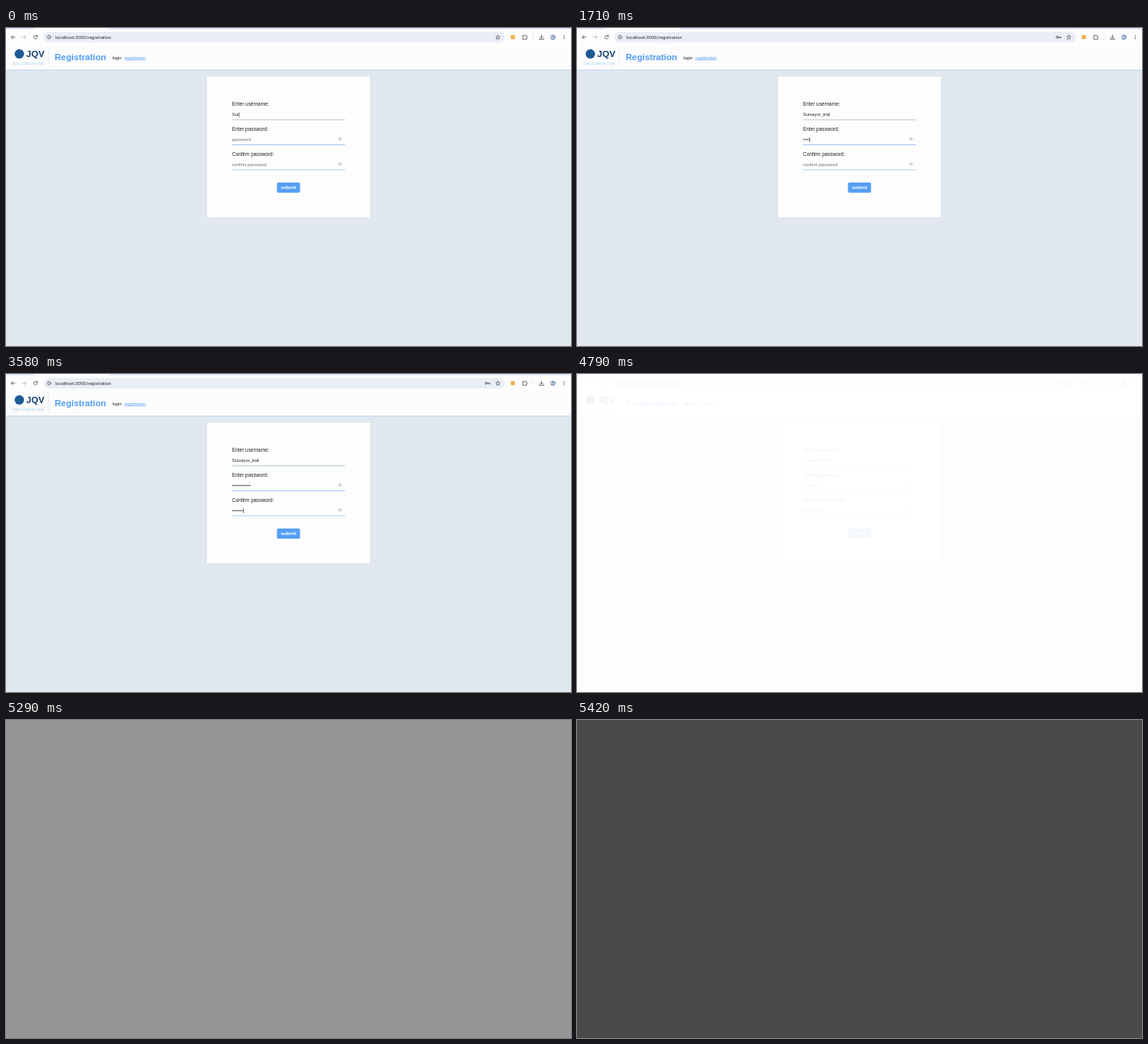
These frames come from a looping animation (720 px wide and 405 px high, 5.46 s). An HTML page:

```html
<!DOCTYPE html>
<html lang="en">
<head>
<meta charset="utf-8">
<title>Registration</title>
<style>
  html, body { margin: 0; width: 100%; height: 100%; overflow: hidden; background: #e1e8f0; }
  svg { display: block; width: 100vw; height: 100vh; }
  text { font-family: "Liberation Sans", Arial, sans-serif; fill: #222; white-space: pre; }
  .url { font: 5.9px Roboto, sans-serif; fill: #2b2d30; }
  .brand { font-size: 11.5px; font-weight: bold; fill: #173f73; }
  .tag { font-size: 4.55px; fill: #a9d3f8; }
  .title { font-size: 11.25px; font-weight: bold; fill: #539df3; }
  .nav { font-size: 5.5px; }
  .link { fill: #539df3; text-decoration: underline; text-decoration-thickness: .4px; }
  .label { font-size: 6.42px; }
  .value { font-size: 5.6px; }
  .hint { font-size: 5.6px; fill: #707070; }
  .button { font-size: 6px; font-weight: bold; fill: #fff; }
  .icon { fill: none; stroke: #42464b; stroke-width: .75; stroke-linecap: round; stroke-linejoin: round; }
  .eye { fill: none; stroke: #c3c5c8; stroke-width: .65; }
</style>
</head>
<body>
<svg viewBox="0 0 720 405" preserveAspectRatio="none">
  <defs>
    <filter id="soft" x="-5%" y="-5%" width="110%" height="110%"><feGaussianBlur stdDeviation="1"/></filter>
    <g id="eye" class="eye">
      <path d="M-3 0Q0-4 3 0Q0 4-3 0Z"/>
      <circle r="1" fill="#c3c5c8"/>
    </g>
  </defs>

  <rect width="720" height="405" fill="#e1e8f0"/>

  <!-- browser bar -->
  <rect width="720" height="23" fill="#fdfdfd"/>
  <path d="M0 0H36Q35.5 1.4 34 1.4H0ZM131 0H720V1.4H133Q131.5 1.4 131 0Z" fill="#d8e5f8"/>
  <rect x="48" y="5" width="587.5" height="13.4" rx="6.7" fill="#e9eef6"/>
  <g class="icon">
    <path d="M11.4 11.7H6.8M8.9 9.5L6.7 11.7L8.9 13.9"/>
    <path d="M20.8 11.7H25.4M23.3 9.5L25.5 11.7L23.3 13.9" stroke="#aeb1b5"/>
    <path d="M39.8 10.4A2.3 2.3 0 1 0 40 12.5M40 9.2V10.8H38.4"/>
    <circle cx="54.8" cy="11.7" r="2.3" stroke-width=".6"/>
    <path d="M54.8 11.6V12.9M54.8 10.4V10.45" stroke-width=".6"/>
    <path d="M626.7 9.1L627.5 10.9L629.4 11.1L628 12.4L628.4 14.3L626.7 13.3L625 14.3L625.4 12.4L624 11.1L625.9 10.9Z" stroke-width=".65"/>
    <path d="M658.5 9.9H660.1A.9.9 0 0 1 661.9 9.9H663.4V11.2A.9.9 0 0 1 663.4 13V14.3H658.5V12.9A.9.9 0 0 0 658.5 11.2Z"/>
    <path d="M682.4 9V12.7M680.8 11.2L682.4 12.8L684 11.2M679.7 13V14.4H685.1V13"/>
    <g stroke="#40659f">
      <circle cx="697" cy="11.7" r="2.8"/>
      <circle cx="697" cy="10.9" r=".85"/>
      <path d="M695.2 13.5Q697 12.1 698.8 13.5"/>
    </g>
  </g>
  <g id="key" class="icon">
    <circle cx="611.9" cy="11.7" r="1.4"/>
    <path d="M613.4 11.7H616.6V12.9M615.2 11.7V12.8"/>
  </g>
  <rect x="643.3" y="9" width="5.2" height="5.2" fill="#f2b04c"/>
  <path d="M671.8 8.4V15" stroke="#d4e2f7" stroke-width=".7"/>
  <g fill="#42464b">
    <circle cx="711.2" cy="9.7" r=".6"/><circle cx="711.2" cy="11.7" r=".6"/><circle cx="711.2" cy="13.7" r=".6"/>
  </g>
  <text class="url" x="62.8" y="13.7">localhost:3000/registration</text>

  <!-- page header -->
  <rect y="22.6" width="720" height="30.8" fill="#fcfcfc"/>
  <path d="M0 53.5H720" stroke="#b9d5f3" stroke-width=".9"/>
  <circle cx="17" cy="33" r="6" fill="#1e5b94"/>
  <text class="brand" x="25.8" y="37.2">JQV</text>
  <text class="tag" x="8" y="47">Data Collection Tool</text>
  <path d="M54.2 24.5V48.5" stroke="#d9e3ec" stroke-width=".6"/>
  <text class="title" x="62" y="41.1">Registration</text>
  <text class="nav" x="135.6" y="39.6">login</text>
  <text class="nav link" x="150.8" y="39.6">registration</text>

  <!-- form -->
  <rect x="256" y="62" width="208" height="179.5" rx="1" fill="#c8d1db" opacity=".7" filter="url(#soft)"/>
  <rect x="256" y="61.8" width="208" height="179.4" rx="1" fill="#fdfdfd"/>
  <text class="label" x="288" y="99.4">Enter username:</text>
  <text class="label" x="288" y="131.2">Enter password:</text>
  <text class="label" x="288" y="163">Confirm password:</text>
  <g stroke-width=".85">
    <path d="M288 116.9H432" stroke="#a3c0c2"/>
    <path d="M288 148.7H432" stroke="#8db9f7"/>
    <path d="M288 180.6H432" stroke="#a6cdf7"/>
  </g>
  <use href="#eye" x="425.8" y="141.3"/>
  <use href="#eye" x="425.8" y="173.1"/>
  <text class="value" id="user" x="288" y="112.4"></text>
  <text class="hint" id="hint1" x="288" y="144.2">password</text>
  <text class="hint" id="hint2" x="288" y="176">confirm password</text>
  <g id="dots1" fill="#222"></g>
  <g id="dots2" fill="#222"></g>
  <rect id="caret" width=".6" height="6.2" fill="#222"/>
  <rect x="345.3" y="196.8" width="29.4" height="13" rx="1.8" fill="#549ff5"/>
  <text class="button" x="360" y="205.4" text-anchor="middle">submit</text>

  <rect id="veil" width="720" height="405" fill="#fff"/>
</svg>
<script>
const LOOP = 5460, NAME = 'Surveyor_trial', PASS = 12, LEFT = 288, PITCH = 2;
const START = { user: 40, pass: 1420, confirm: 2960 };
const FOCUS = { pass: 1230, confirm: 2600 };
const WHITE = { from: 4110, to: 4790, max: 0.935 };
// [time, grey level] of the closing fade
const DARK = [[5130, 227], [5210, 189], [5290, 150], [5330, 130], [5380, 99], [5420, 74]];

const $ = id => document.getElementById(id);
const show = (el, on) => el.setAttribute('visibility', on ? 'visible' : 'hidden');
const clamp = (v, lo, hi) => Math.min(hi, Math.max(lo, v));

// keys pressed by time t
const typed = (t, start, gap, max) => clamp(Math.floor((t - start) / gap) + 1, 0, max);

function makeDots(group, y) {
  for (let i = 0; i < PASS; i++) {
    const dot = document.createElementNS('http://www.w3.org/2000/svg', 'circle');
    dot.setAttribute('cx', LEFT + 0.95 + i * PITCH);
    dot.setAttribute('cy', y);
    dot.setAttribute('r', 0.75);
    group.append(dot);
  }
}

function setSecret(dots, hint, n) {
  [...dots.children].forEach((dot, i) => show(dot, i < n));
  show(hint, n === 0);
}

function placeCaret(x, y) {
  $('caret').setAttribute('x', x);
  $('caret').setAttribute('y', y - 3.1);
}

function render(t) {
  const chars = 3 + typed(t, START.user, 105, NAME.length - 3);
  const pass = typed(t, START.pass, 96, PASS);
  const confirm = typed(t, START.confirm, 96, PASS);

  $('user').textContent = NAME.slice(0, chars);
  setSecret($('dots1'), $('hint1'), pass);
  setSecret($('dots2'), $('hint2'), confirm);
  show($('key'), t >= START.pass);

  if (t < FOCUS.pass) placeCaret(LEFT + $('user').getComputedTextLength(), 110.4);
  else if (t < FOCUS.confirm) placeCaret(LEFT + pass * PITCH, 142.3);
  else placeCaret(LEFT + confirm * PITCH, 174.1);

  const veil = $('veil');
  const dark = DARK.filter(step => t >= step[0]).pop();
  const grey = dark ? dark[1] : 255;
  const fade = clamp((t - WHITE.from) / (WHITE.to - WHITE.from), 0, 1) * WHITE.max;
  veil.setAttribute('fill', `rgb(${grey},${grey},${grey})`);
  veil.setAttribute('opacity', dark ? 1 : fade);
}

makeDots($('dots1'), 142);
makeDots($('dots2'), 173.9);

const begin = performance.now();
function tick() {
  render((performance.now() - begin) % LOOP);
  requestAnimationFrame(tick);
}
render(0);
requestAnimationFrame(tick);
</script>
</body>
</html>
```
